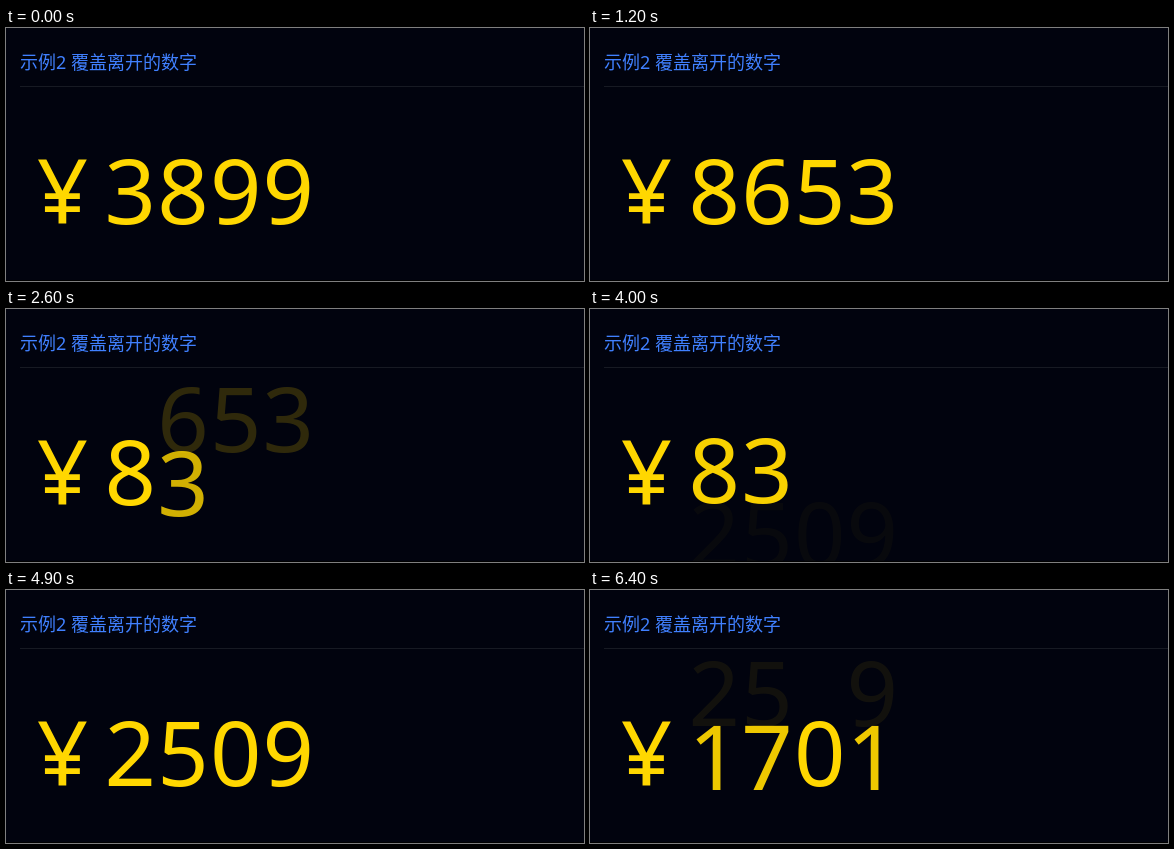
An HTML page for the animation above (6.5 s loop, 578 by 253 pixels).

```html
<!DOCTYPE html>
<html lang="zh-CN">
<head>
<meta charset="utf-8">
<style>
html, body { margin: 0; width: 100%; height: 100%; overflow: hidden; background: #01030e; }
svg { display: block; }
.title { font: 18px "Noto Sans", "Noto Sans CJK SC", "Noto Sans CJK", "Noto Sans CJK JP", sans-serif; fill: #4080ff; }
.price { font: 90px "Noto Sans", "Open Sans", sans-serif; fill: #ffd700; }
</style>
</head>
<body>
<svg width="578" height="253" viewBox="0 0 578 253">
  <text class="title" x="14" y="41">示例2 覆盖离开的数字</text>
  <rect x="14" y="58" width="564" height="1" fill="#171a23"/>
  <g class="price" id="price"><text x="56.5" y="196" text-anchor="middle">¥</text></g>
  <rect y="252" width="578" height="1" fill="#000"/>
</svg>
<script>
const LOOP = 6500, STEP = 100, DURATION = 1000;
const SHIFT = 64, BASELINE = 196, LEFT = 98.5, PITCH = 52.7;
const values = ['3899', '8653', '83', '2509', '1701'];
const starts = [250, 2080, 3955, 5720];
const price = document.getElementById('price');

const addDigit = slot => {
  const el = document.createElementNS('http://www.w3.org/2000/svg', 'text');
  el.setAttribute('x', LEFT + slot * PITCH);
  return price.appendChild(el);
};
const slots = [0, 1, 2, 3].map(i => ({ leaving: addDigit(i), entering: addDigit(i) }));

// The CSS "ease" curve: cubic-bezier(.25, .1, .25, 1)
const bezier = (a, b, u) => 3 * a * u * (1 - u) ** 2 + 3 * b * u * u * (1 - u) + u ** 3;
function ease(x) {
  if (x <= 0 || x >= 1) return x <= 0 ? 0 : 1;
  let lo = 0, hi = 1;
  for (let i = 0; i < 24; i++) {
    const mid = (lo + hi) / 2;
    if (bezier(.25, .25, mid) < x) lo = mid; else hi = mid;
  }
  return bezier(.1, 1, lo);
}

function place(el, char, dy, opacity) {
  el.textContent = char;
  el.setAttribute('y', BASELINE + dy);
  el.setAttribute('opacity', opacity);
}

function draw(time) {
  // The picture advances in tenths of a second
  const t = Math.floor(time % LOOP / STEP) * STEP;
  const turn = Math.max(0, starts.filter(s => s <= t).length - 1);
  const p = ease((t - starts[turn]) / DURATION);
  slots.forEach(({ leaving, entering }, i) => {
    const from = values[turn][i] || '', to = values[turn + 1][i] || '';
    if (from === to) {
      place(leaving, '', 0, 0);
      place(entering, to, 0, 1);
    } else {
      place(leaving, from, -SHIFT * p, 1 - p);
      place(entering, to, SHIFT * (1 - p), p);
    }
  });
}

const origin = performance.now();
function tick() {
  draw(performance.now() - origin);
  requestAnimationFrame(tick);
}
tick();
</script>
</body>
</html>
```
